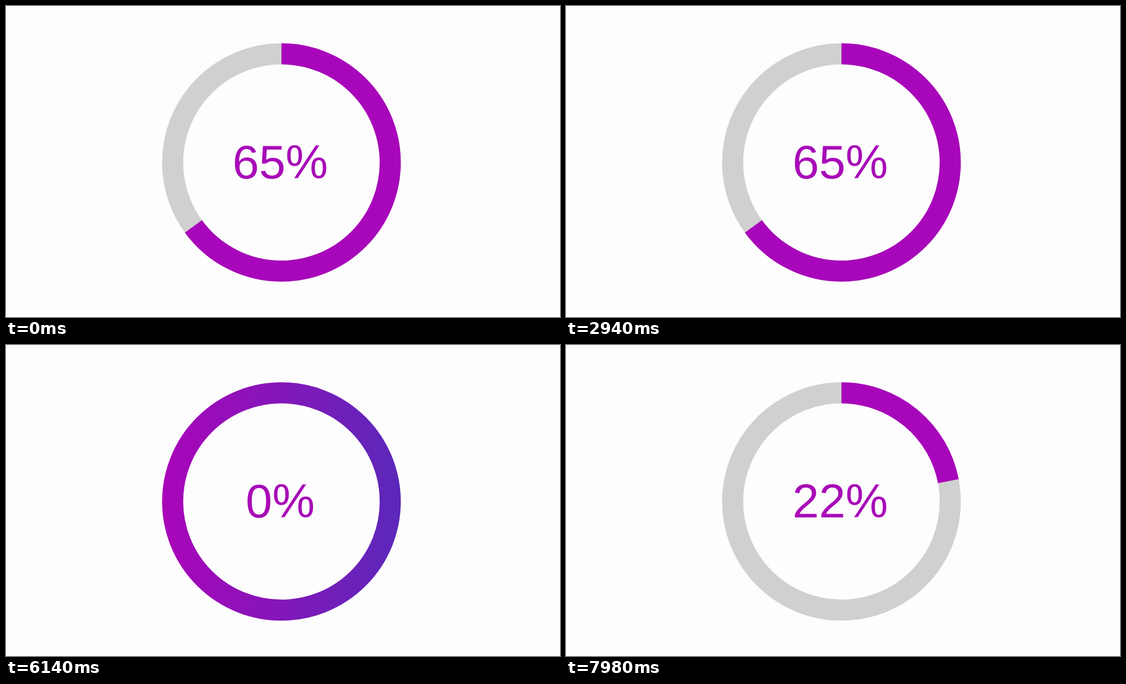
Write an HTML page that moves like this. It is 998 px wide and 561 px high and loops after 8 s.

```html
<!DOCTYPE html>
<html lang="en">
<head>
<meta charset="utf-8">
<title>Progress ring</title>
<style>
  html, body { margin: 0; width: 100%; height: 100%; overflow: hidden; background: #fdfdfd; }
  svg { display: block; width: 100%; height: 100%; }
  circle { fill: none; stroke-width: 38; }
  #arc { stroke: #a806ba; }
  text { font: 86px "Liberation Sans", Arial, sans-serif; fill: #a80ab8; text-anchor: middle; }
</style>
</head>
<body>
<svg viewBox="0 0 998 561">
  <defs>
    <linearGradient id="sweep" gradientUnits="userSpaceOnUse" x1="281" y1="0" x2="711" y2="0">
      <stop offset="0" stop-color="#aa05b8"/>
      <stop offset="1" stop-color="#5b28ba"/>
    </linearGradient>
  </defs>
  <circle id="track" cx="496.2" cy="282.3" r="196"/>
  <circle id="arc" cx="496.2" cy="282.3" r="196" pathLength="100" transform="rotate(-90 496.2 282.3)"/>
  <text id="label" x="494" y="311"></text>
</svg>
<script>
  const LOOP = 8000, FRAME = 20;
  const RESET = 6140;              // the finished run jumps back to zero
  const COUNT_START = 6096, TICK = 84;
  const FINAL = 65;

  const track = document.getElementById('track');
  const arc = document.getElementById('arc');
  const label = document.getElementById('label');

  function percentAt(time) {
    if (time < RESET) return FINAL;
    return Math.min(FINAL, Math.floor((time - COUNT_START) / TICK));
  }

  function show(percent) {
    track.setAttribute('stroke', percent ? '#d0d0d0' : 'url(#sweep)');
    arc.setAttribute('visibility', percent ? 'visible' : 'hidden');
    arc.setAttribute('stroke-dasharray', `${percent} 100`);
    label.textContent = `${percent}%`;
  }

  const start = performance.now();
  function render() {
    const time = (performance.now() - start) % LOOP;
    show(percentAt(Math.floor(time / FRAME) * FRAME));
    requestAnimationFrame(render);
  }
  render();
</script>
</body>
</html>
```
